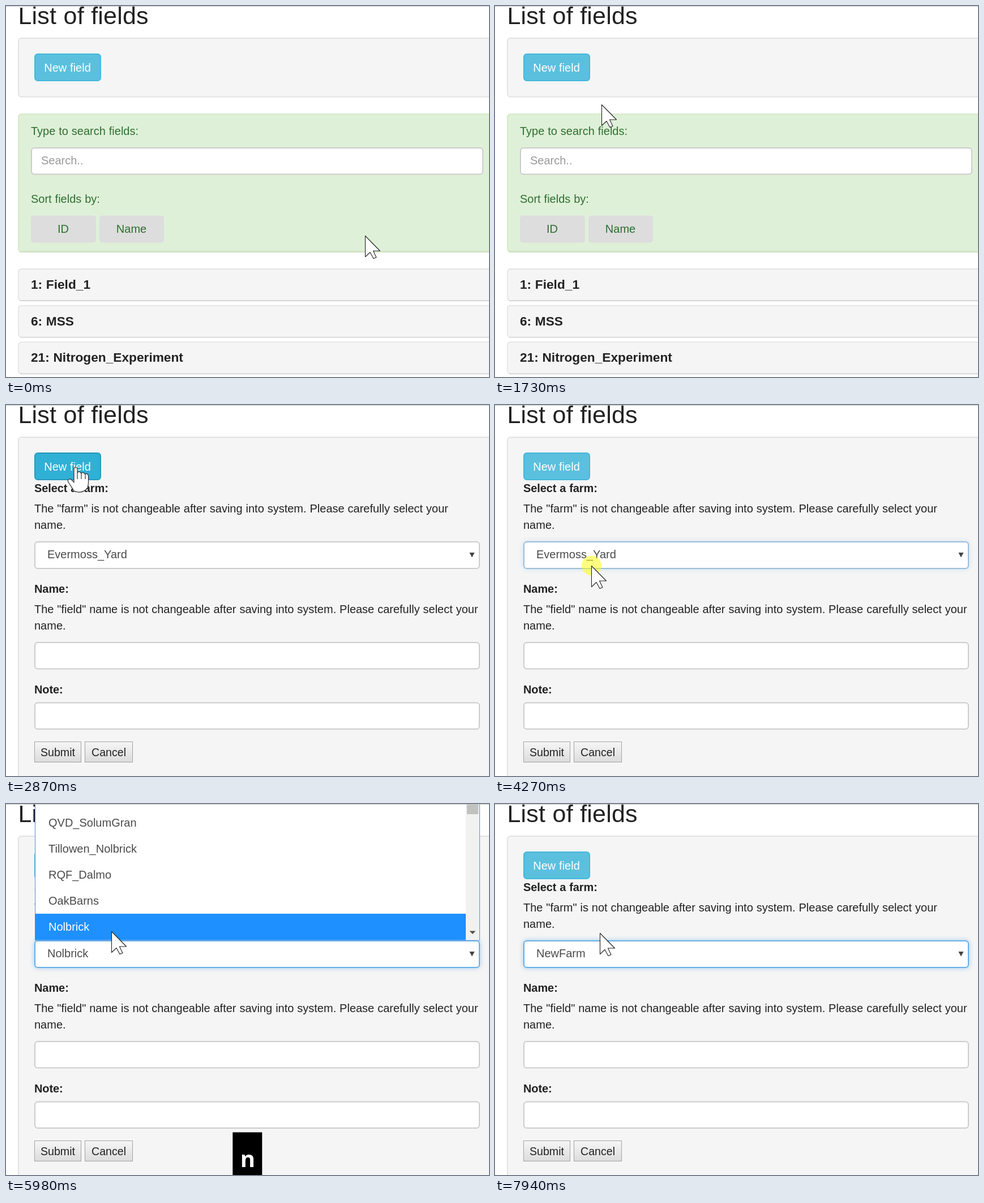
An HTML page for the animation above (8000 ms loop, 853 px wide and 656 px high).

```html
<!DOCTYPE html>
<html lang="en">
<head>
<meta charset="utf-8">
<title>List of fields</title>
<style>
  html, body { margin: 0; width: 100%; height: 100%; overflow: hidden; background: #fff; }
  svg { display: block; width: 853px; height: 656px; }
  text { font: 20px "Liberation Sans", Arial, sans-serif; word-spacing: .35px; fill: #222; white-space: pre; }
  .title { font-size: 43px; letter-spacing: .17px; }
  .bold { font-weight: bold; letter-spacing: -.08px; }
  .head { font-size: 22.7px; font-weight: bold; }
  .green { fill: #2f6f30; }
  .value { fill: #4a4a4a; }
  .mid { text-anchor: middle; }
  .label { font-size: 19.6px; text-anchor: middle; }
  .well { fill: #f5f5f5; stroke: #e3e3e3; stroke-width: 2; }
  .input { fill: #fff; stroke: #ccc; stroke-width: 2; }
  .row { fill: #f5f5f5; stroke: #ddd; stroke-width: 1.3; }
  .sort { fill: #ddd; }
  .push { fill: url(#push); stroke: #a3a3a3; }
  .key { font: bold 40px "Open Sans", "Noto Sans", sans-serif; fill: #fff; text-anchor: middle; }
  .cursor { fill: #fff; stroke: #222; stroke-width: 1.1; stroke-linejoin: round; }
</style>
</head>
<body>
<svg viewBox="0 0 853 656">
  <defs>
    <linearGradient id="push" x2="0" y2="1">
      <stop stop-color="#f6f6f6"/><stop offset="1" stop-color="#dcdcdc"/>
    </linearGradient>
  </defs>
  <text class="title" x="21.5" y="32">List of fields</text>

  <g id="list">
    <rect class="well" x="22" y="57" width="880" height="103.5" rx="5"/>
    <rect x="22" y="191" width="880" height="244" rx="5" fill="#dff0d8" stroke="#d3e7c2" stroke-width="1.6"/>
    <path d="M24 434.5H853" stroke="#d0e4c0" stroke-width="2.4"/>
    <text class="green" x="44" y="228">Type to search fields:</text>
    <rect class="input" x="45" y="251" width="797" height="46.5" rx="5"/>
    <text x="62" y="280" style="fill:#999">Search..</text>
    <text class="green" x="44" y="348">Sort fields by:</text>
    <rect class="sort" x="44" y="370.5" width="115" height="48" rx="5"/>
    <rect class="sort" x="165" y="370.5" width="114" height="48" rx="5"/>
    <text class="green mid" x="101" y="401">ID</text>
    <text class="green mid" x="221.5" y="401">Name</text>
    <g id="rows"></g>
  </g>

  <g id="form">
    <rect class="well" x="22" y="57" width="880" height="700" rx="5"/>
    <text class="bold" x="50" y="154">Select a farm:</text>
    <text x="50" y="190">The "farm" is not changeable after saving into system. Please carefully select your</text>
    <text x="50" y="219">name.</text>
    <rect id="select" class="input" x="51" y="242" width="785" height="47" rx="5"/>
    <text id="chosen" class="value" x="73" y="271"></text>
    <path d="M818.5 261h9l-4.5 8.5z" fill="#444"/>
    <text class="bold" x="50" y="332">Name:</text>
    <text x="50" y="368">The "field" name is not changeable after saving into system. Please carefully select your</text>
    <text x="50" y="397">name.</text>
    <rect class="input" x="51" y="420" width="785" height="46.5" rx="5"/>
    <text class="bold" x="50" y="510">Note:</text>
    <rect class="input" x="51" y="526.5" width="785" height="46.5" rx="5"/>
    <rect class="push" x="50.5" y="595.5" width="82" height="36"/>
    <rect class="push" x="139.5" y="595.5" width="84" height="36"/>
    <text class="label" x="91.5" y="620.5">Submit</text>
    <text class="label" x="181.5" y="620.5">Cancel</text>
  </g>

  <rect id="button" x="51" y="85" width="116" height="47" rx="5" stroke-width="2"/>
  <text class="mid" x="108.5" y="116" style="fill:#fff">New field</text>

  <g id="popup">
    <rect x="51.5" y="-10" width="785" height="251" fill="#fff" stroke="#5b8fd0"/>
    <rect id="hover" x="51.5" y="194" width="760.5" height="46.5" fill="#1e90ff"/>
    <g id="options"></g>
    <rect x="812" y="0" width="24" height="240.5" fill="#f1f1f1"/>
    <rect id="thumb" x="814" y="0" width="20" fill="#c1c1c1"/>
    <path d="M818.5 224.5h11l-5.5 5.5z" fill="#505050"/>
  </g>

  <path d="M0 .5H853" stroke="#c4c4c4"/>
  <g id="keys"></g>

  <g id="pointer">
    <circle id="click" cx=".5" r="17.5" fill="#ff0" opacity=".5"/>
    <path id="arrow" class="cursor" d="M.5 .5V37.5L9 29.5L15 40.5L20 38.5L14.5 27H26.5Z"/>
    <path id="hand" class="cursor" d="M-3 24V3Q-3 0 0 0T3 3V11Q3 8 6 8T10 12Q10 9 13 9.500T17 13Q17 11 19.500 11.500T22.500 16V27Q22.500 36 18 40Q8 47 -3 42L-6 37L-13 26Q-15 22 -11 21Q-8 20 -3 27ZM3 10V21M10 12V21M17 13V21"/>
  </g>
</svg>
<script>
const LOOP = 8000;
const $ = id => document.getElementById(id);
const show = (id, on) => $(id).setAttribute('display', on ? 'inline' : 'none');
const within = (t, a, b) => t >= a && t < b;

const farms = ['Demo_Farm', 'Field_Trials', 'Hilltop', 'QVD_SolumGran', 'Tillowen_Nolbrick',
  'RQF_Dalmo', 'OakBarns', 'Nolbrick', 'Nolbrick_DPlots', 'NewFarm'];
const keyWidth = { n: 52, e: 47, w: 63 };

// Pointer moves: start, end, number of steps, then the points passed
const moves = [
  [520, 1260, 10, [634, 406], [281, 207]],
  [1340, 1730, 6, [281, 207], [188, 174]],
  [2090, 2630, 8, [188, 174], [123, 110]],
  [3240, 3950, 10, [123, 110], [138, 205], [152, 346], [170, 284]],
  [4740, 5130, 6, [170, 284], [186, 225]],
  [7940, 7940, 1, [186, 225], [185, 228]],
];

$('rows').innerHTML = ['1: Field_1', '6: MSS', '21: Nitrogen_Experiment'].map((name, i) => {
  const y = 465 + i * 64.6;
  return `<rect class="row" x="22" y="${y}" width="880" height="56" rx="5"/>
    <path d="M25 ${y + 56.3}H853" stroke="#d2d2d2" stroke-width="1.4"/>
    <text class="head" x="44" y="${y + 35}">${name}</text>`;
}).join('');

function pointerAt(t) {
  let pos = moves[0][3];
  for (const [start, end, steps, ...points] of moves) {
    if (t < start) break;
    const gap = (end - start) / (steps - 1) || 1;
    const p = Math.min(1, (Math.floor((t - start) / gap + .01) + 1) / steps);
    const along = p * p * (3 - 2 * p) * (points.length - 1);
    const i = Math.min(Math.floor(along), points.length - 2);
    pos = points[i].map((v, k) => Math.round(v + (points[i + 1][k] - v) * (along - i)));
  }
  return pos;
}

function drawPopup(t, y) {
  const open = within(t, 4340, 7630);
  show('popup', open);
  if (!open) return;
  const lit = y < 240;
  const first = t < 5980 ? 0 : t < 6130 ? 3 : 5;
  show('hover', lit);
  $('thumb').setAttribute('height', t < 5980 ? 0 : t < 6130 ? 18 : 42);
  $('options').innerHTML = farms.slice(first, first + 5).map((name, i) =>
    `<text x="75" y="${40 + i * 46}" style="fill:${lit && i === 4 ? '#fff' : '#4a4a4a'}">${name}</text>`).join('');
}

function drawKeys(t) {
  const keys = !within(t, 5980, 7240) ? '' : t < 6130 ? 'n' : t < 6300 ? 'e' : t < 7100 ? 'ew' : 'w';
  let x = 426.3 - [...keys].reduce((sum, k) => sum + keyWidth[k], 0) / 2;
  $('keys').innerHTML = [...keys].map(k => {
    const w = keyWidth[k], left = x;
    x += w;
    return `<rect x="${left}" y="580.5" width="${w}" height="76"/>
      <text class="key" x="${left + w / 2 + .5}" y="641.5">${k}</text>`;
  }).join('');
}

function draw(t) {
  const [x, y] = pointerAt(t);
  const onButton = x > 50 && x < 168 && y > 84 && y < 133;
  const formOpen = t >= 2780;
  show('list', !formOpen);
  show('form', formOpen);

  $('button').setAttribute('fill', onButton ? '#31b0d5' : '#5bc0de');
  $('button').setAttribute('stroke', onButton ? '#269abc' : '#46b8da');

  // Focus ring fades in on the select box
  const glow = t < 4200 ? 0 : t < 4270 ? .1 : t < 4340 ? .5 : 1;
  const mix = (a, b) => a + (b - a) * glow;
  $('select').style.stroke = `rgb(${mix(204, 102)},${mix(204, 175)},${mix(204, 233)})`;
  $('select').style.filter = glow ? `drop-shadow(0 0 4px rgba(102,175,233,${.6 * glow}))` : 'none';
  $('chosen').textContent = t < 5980 ? 'Evermoss_Yard' : t < 6130 ? 'Nolbrick' : 'NewFarm';

  drawPopup(t, y);
  drawKeys(t);

  $('pointer').setAttribute('transform', `translate(${x} ${y})`);
  show('arrow', !onButton);
  show('hand', onButton);
  show('click', within(t, 2630, 2870) || within(t, 4200, 4420) || within(t, 7470, 7700));
}

const begin = performance.now();
function tick() {
  draw((performance.now() - begin) % LOOP);
  requestAnimationFrame(tick);
}
tick();
</script>
</body>
</html>
```
